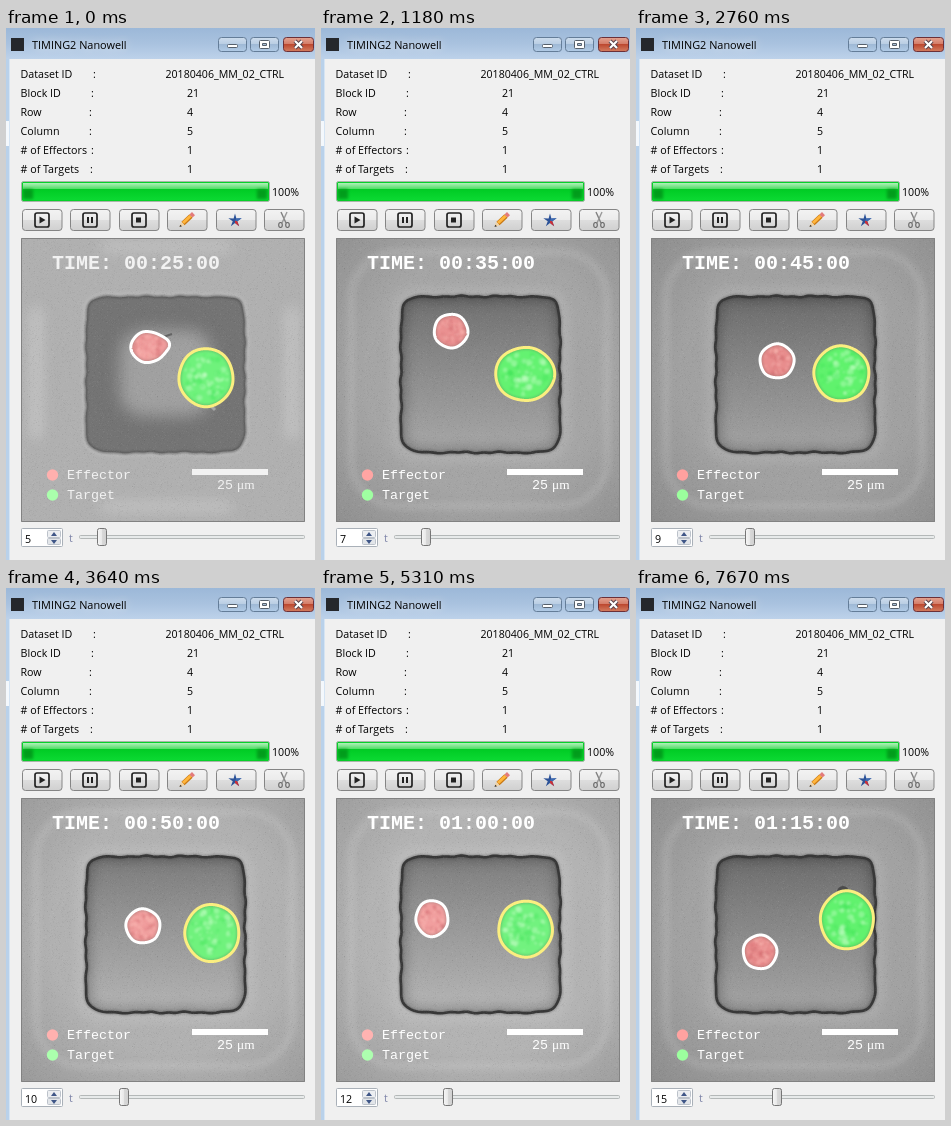
Recreate the animation shown at these times as an HTML page with a canvas. Size 309 by 532 pixels, loop 8000 ms.

```html
<!DOCTYPE html>
<html>
<head>
<meta charset="utf-8">
<style>
  html, body { margin: 0; width: 100%; height: 100%; overflow: hidden; background: #f0f0f0; }
  canvas { display: block; }
</style>
</head>
<body>
<canvas id="stage" width="309" height="532"></canvas>
<script>
const ctx = document.getElementById('stage').getContext('2d');
const UI = '"Open Sans", "Noto Sans", sans-serif';
const MONO = '"Liberation Mono", "Courier New", monospace';
const SERIF = '"Liberation Serif", serif';
const LOOP = 8000, FIRST = 5;

// Start time, background grey, effector [x, y, rx, ry], target [x, y, rx, ry]
const STEPS = [
  [0,    176, [142, 319, 17, 15.5], [200, 349.5, 27, 29]],
  [450,  170, [136, 311, 17, 16], [202, 348, 28, 28]],
  [1180, 165, [130, 303, 16.8, 16.8], [204, 346, 29.5, 26.5]],
  [2070, 147, [144.5, 328.5, 16.8, 17], [205.5, 346, 28.5, 27]],
  [2760, 161, [141, 333, 17, 17], [205.5, 345.5, 27.5, 27.5]],
  [3640, 177, [137, 338, 17, 17], [206, 345, 27, 28.5]],
  [4410, 153, [128, 334, 17.5, 16], [205, 342, 26, 28.5]],
  [5310, 179, [111, 330.5, 16, 18], [204.5, 341, 26.8, 28]],
  [6060, 172, [115, 342, 16, 17], [206, 339, 27, 28]],
  [6800, 167, [119, 353, 17, 17], [209, 336, 27, 28]],
  [7670, 162, [124, 364, 16.8, 16.8], [211, 332, 26.5, 29]]
];

function randomizer(seed) {
  return () => (seed = (seed * 16807) % 2147483647) / 2147483647;
}
const grey = (v, a = 1) => `rgba(${v},${v},${v},${a})`;

function gradient(x0, y0, x1, y1, ...stops) {
  const g = ctx.createLinearGradient(x0, y0, x1, y1);
  stops.forEach(([at, color]) => g.addColorStop(at, color));
  return g;
}
function rect(x, y, w, h, fill) {
  ctx.fillStyle = fill;
  ctx.fillRect(x, y, w, h);
}
function box(x, y, w, h, r, fill, stroke, width = 1) {
  ctx.beginPath();
  ctx.roundRect(x, y, w, h, r);
  if (fill) { ctx.fillStyle = fill; ctx.fill(); }
  if (stroke) { ctx.strokeStyle = stroke; ctx.lineWidth = width; ctx.stroke(); }
}
function text(s, x, y, size = 10.7, color = '#000', font = UI, weight = '') {
  ctx.font = `${weight} ${size}px ${font}`;
  ctx.fillStyle = color;
  ctx.fillText(s, x, y);
}
function line(points, color, width = 1) {
  ctx.beginPath();
  points.forEach(([x, y]) => ctx.lineTo(x, y));
  ctx.strokeStyle = color;
  ctx.lineWidth = width;
  ctx.stroke();
}
function shape(points, fill) {
  ctx.beginPath();
  points.forEach(([x, y]) => ctx.lineTo(x, y));
  ctx.closePath();
  ctx.fillStyle = fill;
  ctx.fill();
}
function disc(x, y, r, fill) {
  ctx.beginPath();
  ctx.arc(x, y, r, 0, 7);
  ctx.fillStyle = fill;
  ctx.fill();
}
// Closed outline given as a radius for each angle
function polar(cx, cy, radius) {
  const path = new Path2D();
  for (let i = 0; i < 360; i++) {
    const a = i * Math.PI / 180, r = radius(a);
    path.lineTo(cx + r * Math.cos(a), cy + r * Math.sin(a));
  }
  path.closePath();
  return path;
}
function soft(blur, path, color, width) {
  ctx.filter = `blur(${blur}px)`;
  ctx.strokeStyle = color;
  ctx.lineWidth = width;
  ctx.stroke(path);
  ctx.filter = 'none';
}

const well = polar(159.5, 346.5, a => {
  const side = (v, half) => Math.abs(v / half) ** 10;
  return (side(Math.cos(a), 79.5) + side(Math.sin(a), 78)) ** -0.1
    + 0.5 * Math.sin(13 * a) + 0.4 * Math.sin(31 * a + 1);
});
const halo = new Path2D();
halo.roundRect(30, 224, 256, 254, 46);

const grain = document.createElement('canvas');
grain.width = grain.height = 128;
{
  const g = grain.getContext('2d'), rnd = randomizer(77);
  for (let i = 0; i < 4000; i++) {
    g.fillStyle = grey(rnd() < 0.5 ? 0 : 255, 0.035);
    g.fillRect(rnd() * 128 | 0, rnd() * 128 | 0, 1, 1);
  }
}

function drawWindow() {
  rect(0, 0, 309, 532, '#f0f0f0');
  rect(0, 0, 309, 31, gradient(0, 0, 0, 31, [0, '#9cb8d8'], [0.5, '#a9c2df'], [1, '#bdd2ea']));
  rect(0, 31, 4, 501, '#b9d1ea');
  rect(0, 93, 3, 25, '#f4f8fc');
  rect(3, 31, 1, 501, '#d5e4f3');
  rect(5, 10, 13, 13, '#25272b');

  ctx.shadowColor = '#fff';
  ctx.shadowBlur = 10;
  text('TIMING2 Nanowell', 26, 20.5, 10.9);
  ctx.shadowBlur = 0;

  const cap = gradient(0, 9, 0, 24, [0, '#cfdeee'], [0.48, '#b9cde3'], [0.5, '#9fb9d6'], [1, '#b3cde8']);
  box(212.5, 9.5, 28, 14, 3, cap, '#647d98');
  box(244.5, 9.5, 28, 14, 3, cap, '#647d98');
  box(277.5, 9.5, 30, 14, 3,
    gradient(0, 9, 0, 24, [0, '#e5a694'], [0.48, '#d37b67'], [0.5, '#bd4930'], [1, '#d58164']), '#6b3038');
  box(221.5, 16.5, 10, 3, 1, '#fff', '#56606c');
  box(253.5, 12.5, 10, 8, 1, '#fff', '#56606c');
  box(256.5, 15.5, 4, 2, 0, '#a9c0d8', '#56606c');
  for (const [color, width] of [['#56404a', 4], ['#fff', 2.2]]) {
    line([[289, 13], [296, 20]], color, width);
    line([[296, 13], [289, 20]], color, width);
  }

  [['Dataset ID', 87, '20180406_MM_02_CTRL', 159.5], ['Block ID', 85, '21', 181], ['Row', 83, '4', 181],
   ['Column', 83, '5', 181], ['# of Effectors', 85, '1', 181], ['# of Targets', 84, '1', 181]]
    .forEach(([label, colon, value, x], i) => {
      const y = 50 + 19 * i;
      text(label, 14.5, y);
      text(':', colon, y);
      text(value, x, y, 10.6);
    });

  box(15.5, 153.5, 248, 20, 2, '#06d229', '#a9b5a9');
  rect(17, 155, 245, 6, gradient(0, 155, 0, 161, [0, '#b0f0b9'], [1, '#50dc66']));
  rect(17, 161, 245, 11, gradient(0, 161, 0, 172, [0, '#00cb24'], [1, '#0bd932']));
  ctx.filter = 'blur(1.5px)';
  rect(17, 161, 10, 10, 'rgba(0,130,20,.65)');
  rect(251, 161, 10, 10, 'rgba(0,130,20,.65)');
  ctx.filter = 'none';
  text('100%', 266, 168);
  drawButtons();
}

function drawButtons() {
  const face = gradient(0, 181, 0, 203, [0, '#f3f3f3'], [0.5, '#ebebeb'], [0.52, '#dddddd'], [1, '#cfcfcf']);
  for (let i = 0; i < 6; i++) {
    const x = Math.round(16 + 48.4 * i) + 0.5;
    box(x, 181.5, 39.5, 21, 3, face, '#858585');
    if (i < 3) box(x + 12.5, 185, 14, 14, 2, null, '#222', 1.7);
  }
  shape([[33.5, 188.5], [33.5, 195.5], [39.5, 192]], '#222');
  rect(81, 189, 2, 6, '#222');
  rect(85, 189, 2, 6, '#222');
  rect(130, 189.5, 5, 5, '#222');

  // Pencil
  line([[177, 195.5], [185, 188]], '#c87814', 4.6);
  line([[177, 195], [184.5, 188]], '#ffb53c', 3);
  line([[185, 188], [187.5, 185.7]], '#e37b7b', 4.4);
  shape([[173.5, 199], [175, 194], [178.5, 197.5]], '#f1d3a5');
  shape([[173.5, 199], [174.2, 196.8], [176, 198.3]], '#333');

  // Star
  const star = Array.from({ length: 10 }, (_, k) => {
    const a = (k / 5 - 0.5) * Math.PI, r = k % 2 ? 2.4 : 7;
    return [229 + r * Math.cos(a), 192.5 + r * Math.sin(a)];
  });
  shape(star, '#2c5298');
  shape([[229, 192.5], ...star.slice(3, 6)], '#cc3038');
  shape([[229, 192.5], ...star.slice(1, 4)], '#3d6ab2');

  // Scissors
  line([[275, 184], [280, 195]], '#808080', 1.4);
  line([[281, 184], [276, 195]], '#999', 1.4);
  for (const x of [274.5, 281.5]) {
    ctx.beginPath();
    ctx.ellipse(x, 197, 1.8, 2.5, 0, 0, 7);
    ctx.strokeStyle = '#666';
    ctx.lineWidth = 1.1;
    ctx.stroke();
  }
}

function drawBackground(level, focused) {
  rect(15, 210, 284, 284, grey(level));
  if (focused) {
    const shade = ctx.createRadialGradient(165, 345, 120, 165, 345, 210);
    shade.addColorStop(0, grey(0, 0));
    shade.addColorStop(1, grey(0, 0.13));
    rect(15, 210, 284, 284, shade);
    soft(3, halo, grey(255, 0.13), 8);
    soft(5, well, grey(255, 0.1), 22);
    ctx.fillStyle = gradient(0, 268, 0, 424,
      [0, grey(level - 54)], [0.35, grey(level - 32)], [1, grey(level + 2)]);
    ctx.fill(well);
    ctx.save();
    ctx.clip(well);
    soft(5, well, grey(30, 0.22), 13);
    ctx.restore();
    soft(1, well, grey(50, 0.4), 4);
    ctx.strokeStyle = grey(56);
    ctx.lineWidth = 2.6;
    ctx.stroke(well);
  } else {
    ctx.filter = 'blur(7px)';
    for (const [x, y, w, h] of [[24, 280, 12, 130], [280, 280, 12, 130], [95, 214, 130, 9], [95, 474, 130, 9]])
      rect(x, y, w, h, grey(225, 0.45));
    ctx.filter = 'none';
    soft(2, well, grey(200, 0.6), 6);
    ctx.fillStyle = grey(116);
    ctx.fill(well);
    ctx.filter = 'blur(8px)';
    box(114, 302, 92, 86, 24, grey(160));
    ctx.filter = 'none';
    soft(1, well, grey(75, 0.8), 2);
  }
  ctx.fillStyle = ctx.createPattern(grain, 'repeat');
  ctx.fillRect(15, 210, 284, 284);
}

function drawCell([x, y, rx, ry], tail, fill, spots, outline, seed) {
  const outlinePath = polar(x, y, a => {
    const turn = Math.atan2(Math.sin(a - tail.dir), Math.cos(a - tail.dir));
    return rx * ry / Math.hypot(ry * Math.cos(a), rx * Math.sin(a))
      + tail.size * Math.exp(-6 * turn * turn) + 0.25 * Math.sin(5 * a + seed);
  });
  const rnd = randomizer(seed * 991 + 13);
  ctx.save();
  ctx.clip(outlinePath);
  ctx.fillStyle = fill;
  ctx.fill(outlinePath);
  ctx.filter = 'blur(1px)';
  for (let i = 0; i < 60; i++) {
    const a = rnd() * 6.3, d = Math.sqrt(rnd()) * 0.8;
    disc(x + rx * d * Math.cos(a), y + ry * d * Math.sin(a), 0.8 + rnd() * rx / 11, spots[i % 3 ? 0 : 1]);
  }
  ctx.filter = 'none';
  soft(1, outlinePath, 'rgba(80,90,80,.25)', 5);
  ctx.restore();
  ctx.strokeStyle = outline;
  ctx.lineWidth = 3;
  ctx.stroke(outlinePath);
}

function drawPanel(step, t) {
  const [, level, effector, target] = step;
  const tint = level, focused = t > FIRST;
  const red = `rgb(255,${tint},${tint - 2})`, green = `rgb(${tint - 6},255,${tint - 4})`;
  const white = focused ? '#fff' : '#f2f2f2';
  ctx.save();
  ctx.beginPath();
  ctx.rect(15, 210, 284, 284);
  ctx.clip();
  drawBackground(level, focused);

  if (!focused) {
    line([[203, 376], [209, 382]], grey(165), 3);
    line([[157, 309], [166, 306]], grey(100), 2);
  }
  if (t > 13) disc(207, 304, 6, grey(75));

  const tails = { 5: { dir: -0.15, size: 5 }, 11: { dir: 3.5, size: 5 } };
  const none = { dir: 0, size: 0 };
  drawCell(effector, tails[t] || none, `rgb(${225 + (level - 147) * 0.5},${level - 20},${level - 20})`,
    ['rgba(255,195,190,.3)', 'rgba(200,90,95,.3)'], '#fff', t);
  drawCell(target, none, `rgb(${level - 65},242,${level - 52})`,
    ['rgba(205,255,205,.4)', 'rgba(60,225,85,.35)'], '#fbee80', t + 20);

  const minutes = t * 5, two = n => String(n).padStart(2, '0');
  text(`TIME: ${two(Math.floor(minutes / 60))}:${two(minutes % 60)}:00`, 46, 241, 20, white, MONO, 'bold');
  disc(46.5, 447, 5.7, red);
  disc(46.5, 467, 5.7, green);
  text('Effector', 61, 451, 13.33, white, MONO);
  text('Target', 61, 471, 13.33, white, MONO);
  rect(186, 441, 76, 6, white);
  text('25', 211, 461, 13.33, white, MONO);
  text('μm', 231, 461, 13.33, white, SERIF);
  ctx.restore();
  box(15.5, 210.5, 283, 283, 0, null, '#828282');
}

function drawControls(t) {
  rect(5, 496, 304, 36, '#f0f0f0');
  box(15.5, 500.5, 41, 18, 1, '#fff', '#a9b0b8');
  text(t, 19, 514.5);
  box(41.5, 502.5, 13, 7, 1, '#eceef1', '#bcc2ca');
  box(41.5, 510.5, 13, 6, 1, '#e2e5e9', '#bcc2ca');
  shape([[45, 508], [51, 508], [48, 504]], '#3f5687');
  shape([[45, 512], [51, 512], [48, 516]], '#3f5687');
  text('t', 63, 513.5, 10.7, '#7e84a8');
  box(73.5, 507.5, 225, 3, 1, '#e7eaea', '#b4b8b8');
  const x = Math.round(91 + 4.48 * (t - FIRST)) + 0.5;
  box(x, 500.5, 9, 17, 2,
    gradient(x, 0, x + 9, 0, [0, '#f6f6f6'], [0.5, '#e8e8e8'], [0.55, '#d8d8d8'], [1, '#d0d0d0']), '#767676');
}

drawWindow();
let shown = -1;
function frame(now) {
  const time = now % LOOP;
  const index = STEPS.findLastIndex(step => time >= step[0]);
  if (index !== shown) {
    shown = index;
    drawPanel(STEPS[index], FIRST + index);
    drawControls(FIRST + index);
  }
  requestAnimationFrame(frame);
}
frame(0);
</script>
</body>
</html>
```
